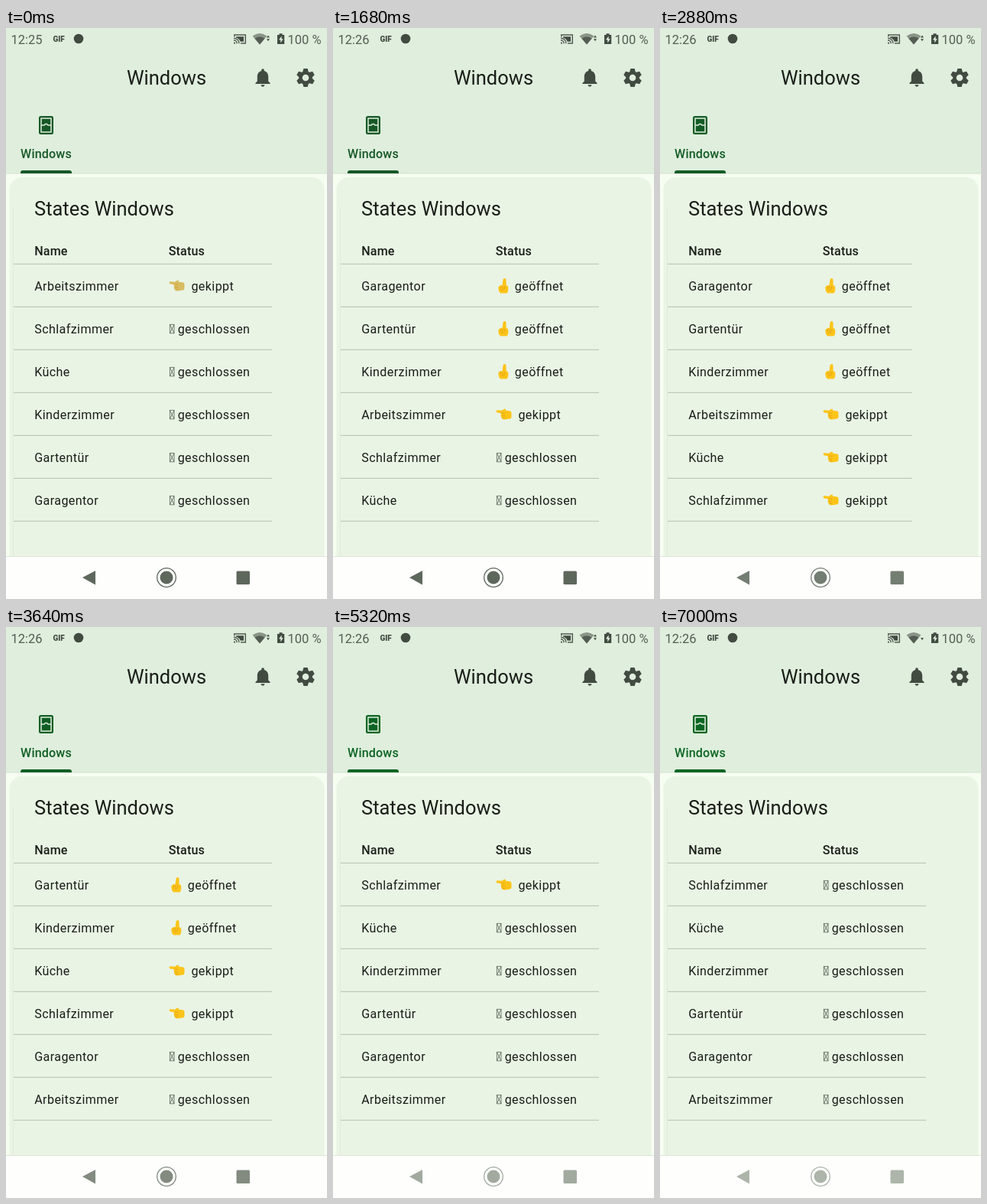
These frames come from a looping animation (420x746 px, 7040 ms). An HTML page:

```html
<!DOCTYPE html>
<html lang="de">
<head>
<meta charset="utf-8">
<style>
  html, body { margin: 0; width: 100%; height: 100%; overflow: hidden; background: #f6fdf1; }
  svg { display: block; width: 420px; height: 746px; font: 16.1px Roboto, sans-serif; fill: #191e17; }
  .headline { font-size: 25.5px; }
  .label { font-weight: 500; letter-spacing: .15px; }
  .cell { letter-spacing: .4px; }
  .bar { font-size: 16.5px; fill: #545d52; }
  .rule { stroke: #bfcabb; stroke-width: 1.3; }
  #statusbar, #actions { fill: #414b40; }
</style>
</head>
<body>
<svg viewBox="0 0 420 746">
  <defs>
    <g id="tilted">
      <path d="M0 -4.2Q0 -5.8 1.7 -5.7L7.5 -5.2L10 -7Q11.5 -8 12.6 -6.7L12 -5.4L18.2 -4.4Q20 -4 20 -2V3Q20 5.2 18 5.6L11 6.6Q7.7 6.8 7.4 4.6Q5.8 3.4 6.6 1.7Q5.5 0 6.5 -1.8L1.5 -2.6Q0 -2.8 0 -4.2Z"/>
      <path d="M7 1.6h4.6M7.6 4.3h4.2M6.8 -1.7h5" fill="none" stroke="#d99a1c" stroke-width=".7"/>
    </g>
    <g id="open">
      <path d="M11 -10Q13 -10 13 -8L13.1 -1Q15.8 -.4 15.8 2V5Q15.5 8 13.8 9.4H5.5Q3 7 2.8 3.4Q2.4 .6 4.6 -.2Q6 -1.6 8 -.8L9 -8.3Q9.3 -10 11 -10Z"/>
      <path d="M6 .2v4M8.5 .2v4.4M11.2 0v3.6q-1.4 2.4-4.2 1.8" fill="none" stroke="#d99a1c" stroke-width=".7"/>
    </g>
    <path id="closed" d="M.9 -5.6h5.6v11.4h-5.6zl5.6 11.4M6.5 -5.6l-5.6 11.4" fill="none" stroke="#434b40" stroke-width=".7"/>
    <path id="tooth" d="M-4 -7L-2.6 -12H2.6L4 -7Z"/>
  </defs>

  <rect width="420" height="746" fill="#f6fdf1"/>
  <rect width="420" height="190" fill="#dfeedd"/>
  <path d="M0 190h420" stroke="#d3e1cf"/>

  <g id="statusbar">
    <text class="bar" x="6.5" y="20.5">12:25</text>
    <text x="61.5" y="18" font-size="10" font-weight="900">GIF</text>
    <circle cx="95" cy="14" r="6.3"/>
    <g fill="none" stroke="#545d52" stroke-width="1.5">
      <path d="M298.8 11.5V9H313.3V20H307"/>
      <path d="M298 13.2a7 7 0 0 1 7 7M298 16a4.2 4.2 0 0 1 4.2 4.2"/>
    </g>
    <path d="M298 18.4a2.2 2.2 0 0 1 2.2 2.2H298ZM301 11.2h10v6.6h-4.4q-1.5-4-5.6-5.2z"/>
    <path d="M322.5 10.5Q332 3.5 341.5 10.5L332 21.5Z" fill="#8a9587"/>
    <path d="M325.5 13.8Q332 9.4 338.5 13.8L332 21.5Z" fill="#545d52"/>
    <path id="upload" d="M341 12.4l2-3 2 3z"/>
    <path d="M341 14.2h4l-2 3z"/>
    <path d="M355 9h2.6V7.2h4V9h2.6v12h-9.2z"/>
    <path d="M360.6 10.5l-3.6 5h2.3v4l3.4-5.2h-2.1z" fill="#dfeedd"/>
    <text class="bar" x="368.5" y="20.5">100 %</text>
  </g>

  <text class="headline" x="210" y="73.5" text-anchor="middle">Windows</text>
  <g id="actions">
    <path transform="translate(321.6 50.3) scale(1.2)" d="M12 22c1.1 0 2-.9 2-2h-4c0 1.1.9 2 2 2zm6-6v-5c0-3.07-1.63-5.64-4.5-6.32V4c0-.83-.67-1.5-1.5-1.5s-1.5.67-1.5 1.5v.68C7.64 5.36 6 7.92 6 11v5l-2 2v1h16v-1l-2-2z"/>
    <g id="gear" transform="translate(392 65)">
      <circle r="6.5" fill="none" stroke="#414b40" stroke-width="4.4"/>
    </g>
  </g>

  <g id="tab">
    <rect x="43" y="115" width="19" height="24" rx="2.5"/>
    <path d="M46 118h13v18h-13zM46 127h4l1.5-1.6h2l1.5 1.6h4" fill="none" stroke="#dfeedd" stroke-width="1.5"/>
    <text class="label" x="52.5" y="170" text-anchor="middle">Windows</text>
    <path d="M19 190v-1q0-3 3-3h61q3 0 3 3v1z"/>
  </g>

  <rect x="4.5" y="195" width="412" height="520" rx="16" fill="#eaf4e5"/>
  <path d="M9.5 235V690" stroke="#e0ecdc"/>
  <text class="headline" x="37" y="245">States Windows</text>
  <text class="label" x="37.2" y="297">Name</text>
  <text class="label" x="212.7" y="297">Status</text>
  <g id="table"></g>

  <rect y="690" width="420" height="56" fill="#fefffd"/>
  <path d="M0 690.5h420" stroke="#dce6d8"/>
  <g id="nav">
    <path d="M100 718L117 709V727.5Z"/>
    <circle cx="210" cy="718" r="8.5"/>
    <circle id="ring" cx="210" cy="718" r="12.3" fill="none" stroke-width="1.3"/>
    <rect x="301.5" y="709.5" width="17.5" height="17.5" rx="1.5"/>
  </g>
</svg>

<script>
const LOOP = 7040;
const $ = id => document.getElementById(id);

const states = {
  open:   { rank: 0, text: 'geöffnet', x: 237.8 },
  tilted: { rank: 1, text: 'gekippt', x: 242.4 },
  closed: { rank: 2, text: 'geschlossen', x: 224.7 }
};
const rooms = ['Arbeitszimmer', 'Schlafzimmer', 'Küche', 'Kinderzimmer', 'Gartentür', 'Garagentor'];
const events = [
  [280, 'Kinderzimmer', 'open'],
  [760, 'Gartentür', 'open'],
  [1240, 'Garagentor', 'open'],
  [1800, 'Schlafzimmer', 'tilted'],
  [2200, 'Küche', 'tilted'],
  [2600, 'Arbeitszimmer', 'tilted'],
  [3000, 'Arbeitszimmer', 'closed'],
  [3440, 'Garagentor', 'closed'],
  [3920, 'Gartentür', 'closed'],
  [4360, 'Kinderzimmer', 'closed'],
  [4960, 'Küche', 'closed'],
  [5440, 'Schlafzimmer', 'closed']
];

for (let a = 0; a < 360; a += 60)
  $('gear').insertAdjacentHTML('beforeend', `<use href="#tooth" transform="rotate(${a})"/>`);

// Most open first; within a state the latest change comes first.
function rowsAfter(count) {
  let rows = rooms.map((name, i) => ({ name, state: i ? 'closed' : 'tilted' }));
  for (const [, name, state] of events.slice(0, count))
    rows = [{ name, state }, ...rows.filter(r => r.name !== name)];
  return rows.sort((a, b) => states[a.state].rank - states[b.state].rank);
}

function drawTable(count) {
  const rows = rowsAfter(count);
  const right = rows.some(r => r.state === 'closed') ? 348 : 330;
  const rule = i => `<path class="rule" d="M10 ${308.3 + 56 * i}H${right}"/>`;
  const hand = count ? '#fcc419' : '#d8bc62';
  $('table').innerHTML = rule(0) + rows.map(({ name, state }, i) => {
    const y = 337 + 56 * i, { text, x } = states[state];
    return `<text class="cell" x="37.2" y="${y + 6}">${name}</text>
      <use href="#${state}" x="213.5" y="${y}" fill="${hand}"/>
      <text class="cell" x="${x}" y="${y + 6}">${text}</text>${rule(i + 1)}`;
  }).join('');
}

const mix = (a, b, p) => `rgb(${a.map((v, i) => Math.round(v + (b[i] - v) * p))})`;
let shown = -1;

function render(now) {
  const t = now % LOOP;
  const count = events.filter(e => e[0] <= t).length;
  if (count !== shown) drawTable(shown = count);

  const fade = Math.min(1, Math.max(0, (t - 1680) / 4240));
  const navColor = mix([94, 103, 92], [173, 181, 170], fade);
  $('nav').setAttribute('fill', navColor);
  $('ring').setAttribute('stroke', navColor);
  $('tab').setAttribute('fill', mix([22, 88, 38], [10, 102, 34], fade));
  $('statusbar').firstElementChild.textContent = t < 280 ? '12:25' : '12:26';
  $('upload').setAttribute('visibility', t < 7000 ? 'visible' : 'hidden');
  requestAnimationFrame(render);
}
render(performance.now());
</script>
</body>
</html>
```
